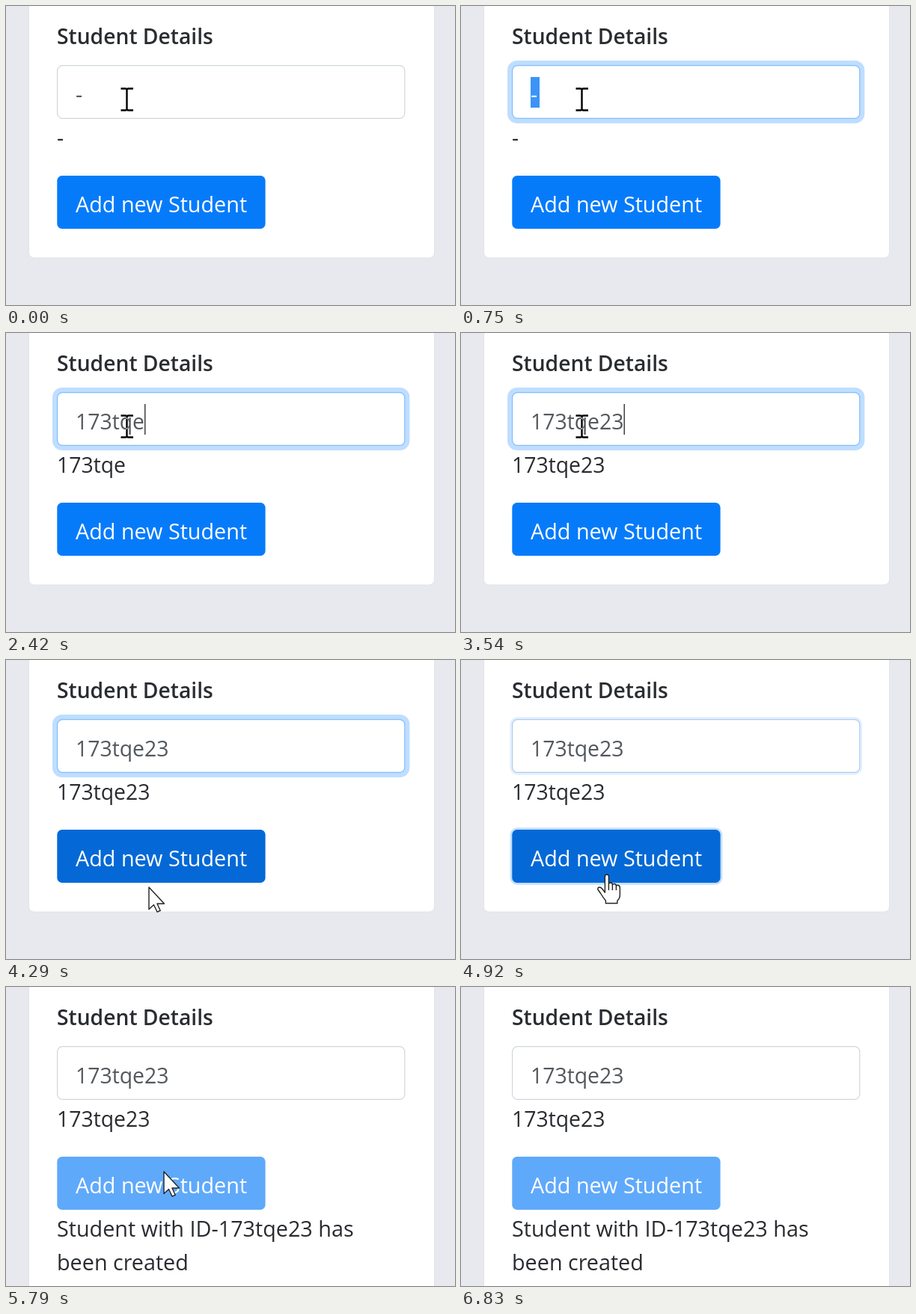
These frames come from a looping animation (600x400 px, 6930 ms). An HTML page:

```html
<!DOCTYPE html>
<html lang="en">
<head>
<meta charset="utf-8">
<title>Student form</title>
<style>
  html, body { margin: 0; width: 100%; height: 100%; overflow: hidden; background: #e8e9ee; }
  svg { display: block; width: 600px; height: 400px; }
  text { font: 28.75px "Open Sans", "Noto Sans", sans-serif; fill: #292c30; white-space: pre; }
  .pointer { fill: #fff; stroke: #222; stroke-width: 1.4; stroke-linejoin: round; }
  #beam { fill: none; stroke: #fff; stroke-width: 2.4; mix-blend-mode: difference; }
</style>
</head>
<body>
<svg viewBox="0 0 600 400">
  <rect width="600" height="400" fill="#e8e9ee"/>
  <rect id="card" x="30.5" y="-20" width="542" height="357" rx="7" fill="#fff" stroke="#e2e3e8"/>
  <text x="68" y="51" style="font-size:28.25px;font-weight:600">Student Details</text>

  <rect id="fieldRing"/>
  <rect id="field" x="68.6" y="79.6" width="464.2" height="70.8" rx="7" fill="#fff" stroke-width="1.2"/>
  <rect id="selection" x="93" y="95" width="12" height="41" fill="#3b94f7"/>
  <text id="typed" x="93" y="128.7" style="font-size:28.4px"></text>
  <rect id="caret" y="95" width="1.4" height="41" fill="#333"/>
  <text id="echo" x="68" y="186.5" style="font-size:28.4px"></text>

  <rect id="buttonRing"/>
  <rect id="button" x="68.3" y="227" width="278.3" height="71" rx="6.500"/>
  <text x="93" y="276" style="fill:#fff">Add new Student</text>
  <g id="message">
    <text x="68" y="333.5">Student with ID-173tqe23 has</text>
    <text x="68" y="379">been created</text>
  </g>

  <path id="beam" d="M-8 -14.5H-2Q0 -14.5 0 -12.5Q0 -14.5 2 -14.5H8.5M0 -13V13M-8 14.5H-2Q0 14.5 0 12.5Q0 14.5 2 14.5H8.5"/>
  <path id="arrow" class="pointer" d="M0 0V29.5L6.5 23.5L11 33L15.2 31.3L11 22H20.5Z"/>
  <path id="hand" class="pointer" d="M-4 2Q-4 -1 -1.5 -1Q1 -1 1 2V12Q1 10 3.5 10Q6 10 6 13Q6.3 11.5 8.5 11.5Q11 11.5 11 14.5Q11.5 13 13.5 13.3Q16 13.8 16 17V26Q16 31 12.5 34V37.5H-3V34Q-7 29 -10 24L-13.5 19Q-14 16 -11 16Q-9 16 -7 19L-4 23ZM1 12V20M6 13V20M11 14.5V20"/>
</svg>
<script>
const LOOP = 6930, TEXT = '173tqe23';
const KEYS = [1200, 1380, 1500, 1660, 2080, 2390, 3380, 3540];
const FOCUS = 300, SELECT = 420, BLUR = 4840, PRESS = 4850, DONE = 5150;
// time, x, y
const PATH = [
  [0, 161.5, 125], [3950, 161.5, 125], [4160, 185, 275], [4290, 191, 304],
  [4380, 192, 305], [4600, 196, 288], [5360, 197, 288], [5790, 211, 247],
  [6040, 225, 243], [6250, 270, 164], [6480, 270, 164], [6670, 444, 108]
];
const $ = id => document.getElementById(id);
const clamp = v => Math.max(0, Math.min(1, v));
const smooth = v => v * v * (3 - 2 * v);
const fade = (t, start) => smooth(clamp((t - start) / 150));
const mix = (a, b, k) => a.map((v, i) => v + (b[i] - v) * k);
const rgb = c => `rgb(${c.map(Math.round)})`;
const show = (id, on) => $(id).style.display = on ? '' : 'none';
const set = (id, attrs) => {
  for (const name in attrs) $(id).setAttribute(name, attrs[name]);
};

function ring(id, [x, y, w, h], k, alpha) {
  const s = 6 * k;
  set(id, { x: x - s, y: y - s, width: w + 2 * s, height: h + 2 * s, rx: 7 + s,
    fill: `rgba(0,123,255,${alpha * k})` });
}

function pointerAt(t) {
  const i = PATH.findIndex(p => p[0] > t);
  if (i < 0) return PATH[PATH.length - 1].slice(1);
  const a = PATH[i - 1], b = PATH[i];
  return mix(a, b, smooth((t - a[0]) / (b[0] - a[0]))).slice(1);
}

function drawField(t) {
  const focus = fade(t, FOCUS) - fade(t, BLUR);
  ring('fieldRing', [68, 79, 465.4, 72], focus, .25);
  set('field', { stroke: rgb(mix([208, 214, 222], [128, 189, 255], focus)) });

  const count = KEYS.filter(k => k <= t).length;
  const value = count ? TEXT.slice(0, count) : '-';
  const selected = t >= SELECT && !count;
  $('typed').textContent = $('echo').textContent = value;
  $('typed').style.fill = selected ? '#fff' : '#53585d';
  show('selection', selected);

  const last = count ? KEYS[count - 1] : FOCUS;
  show('caret', t >= FOCUS && t < BLUR && !selected && (t - last) % 1060 < 530);
  set('caret', { x: 93 + $('typed').getComputedTextLength() });
}

function drawButton(t) {
  const done = t >= DONE;
  const hover = mix([6, 123, 250], [4, 105, 214], fade(t, 4110));
  set('button', { fill: rgb(mix(hover, [95, 169, 251], fade(t, DONE))) });
  ring('buttonRing', [68.3, 227, 278.3, 71], fade(t, PRESS) - fade(t, DONE), .5);
  show('message', done);
  set('card', { height: done ? 460 : 357 });
}

function drawPointer(t) {
  const [x, y] = pointerAt(t);
  const kind = t >= DONE ? 'arrow' : y < 195 ? 'beam' : y > 227 && y < 298 ? 'hand' : 'arrow';
  for (const id of ['beam', 'arrow', 'hand']) {
    show(id, id === kind && t < 6830);
    set(id, { transform: `translate(${x} ${y})` });
  }
}

const start = performance.now();
function frame() {
  const t = (performance.now() - start) % LOOP;
  drawField(t);
  drawButton(t);
  drawPointer(t);
  requestAnimationFrame(frame);
}
frame();
</script>
</body>
</html>
```
